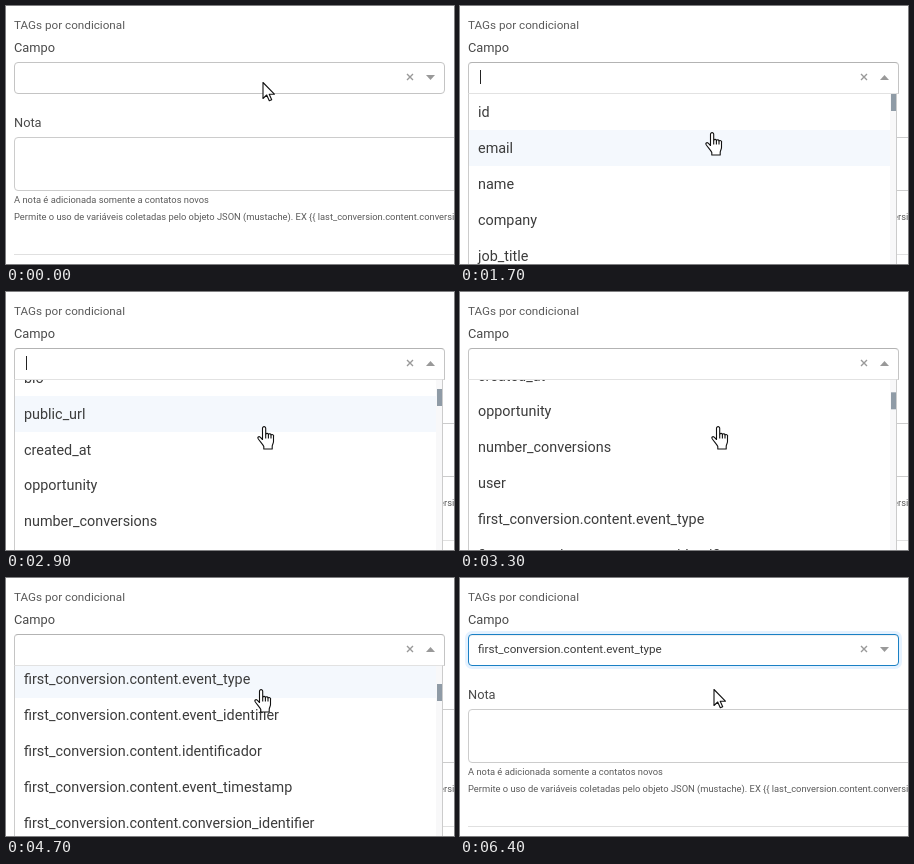
An HTML page for the animation above (7000 ms loop, 448 by 258 pixels).

```html
<!DOCTYPE html>
<html lang="pt-BR">
<head>
<meta charset="utf-8">
<title>TAGs por condicional</title>
<style>
  @property --scroll { syntax: "<number>"; inherits: true; initial-value: 0; }

  html, body { margin: 0; width: 100%; height: 100%; overflow: hidden; background: #fff; }
  #stage {
    position: relative; width: 448px; height: 258px; overflow: hidden;
    font-family: Roboto, sans-serif; color: #4a4a4a; white-space: nowrap;
  }
  #stage * { box-sizing: border-box; }
  #stage > *, .menu > *, .select > * { position: absolute; }

  /* one shared clock; every track holds its value unless a keyframe says otherwise */
  .anim { animation: 7s step-end infinite; }

  .text { left: 8px; height: 20px; line-height: 20px; }
  .title { top: 9px; font-size: 11.7px; color: #5a5a5a; }
  .label { font-size: 12.8px; }
  .hint { font-size: 9.35px; color: #5a5a5a; }
  .note { left: 8px; top: 131px; width: 460px; height: 54px; border: 1px solid #ccc; border-radius: 4px; }
  .rule { left: 8px; top: 248px; width: 440px; height: 1px; background: #e0e0e0; }

  .select {
    left: 8px; top: 56px; width: 431px; height: 32px;
    border: 1px solid #c4c4c4; border-radius: 4px; background: #fff;
    animation-name: frame;
  }
  .value { left: 9px; top: 4px; line-height: 20px; font-size: 11.7px; color: #3c3c3c; animation-name: chosen; }
  .caret { left: 11px; top: 7px; width: 1.3px; height: 14px; background: #222; animation-name: blink; }
  .clear { left: 391px; top: 10px; stroke: #999; stroke-width: 1.4; }
  .arrow {
    left: 411px; top: 12px; width: 9px; height: 5px; background: #999;
    clip-path: polygon(0 0, 100% 0, 50% 100%); animation-name: flip;
  }

  .menu {
    left: 8px; top: 87px; width: 429px; height: 180px; overflow: hidden;
    border: 1px solid #ccc; border-top-color: #e2e2e2; background: #fff;
    animation-name: open, scroll;
  }
  .list { left: 0; top: 0; width: 100%; padding-top: .95px; transform: translateY(calc(var(--scroll) * -1px)); }
  .mark { position: absolute; width: 100%; height: 36px; background: #f4f8fd; animation-name: mark; }
  .item { position: relative; height: 35.95px; padding-left: 9px; line-height: 36px; font-size: 14.4px; color: #3c3c3c; }
  .bar { right: 0; top: 0; width: 6px; height: 100%; background: #f8f8f9; }
  .thumb {
    right: 0; top: 0; width: 5px; height: 17px; background: #8f9ba6;
    transform: translateY(calc(var(--scroll) * .045px));
  }

  .cursor {
    left: 0; top: 0; overflow: visible; fill: #fff; stroke: #111; stroke-width: 1.1;
    stroke-linejoin: round; animation-name: move;
  }
  .pointer { animation-name: pointer; }
  .hand { animation-name: hand; }

  @keyframes open { 0% { opacity: 0 } 8.571% { opacity: 1 } 81.429%, 100% { opacity: 0 } }
  @keyframes chosen { 0% { opacity: 0 } 81.429%, 100% { opacity: 1 } }
  @keyframes flip { 0% { transform: none } 8.571% { transform: scaleY(-1) } 81.429%, 100% { transform: none } }
  @keyframes frame {
    0% { border-color: #c4c4c4; border-radius: 4px; box-shadow: none }
    8.571% { border-color: #b3b3b3 #c4c4c4 #d9d9d9; border-radius: 4px 4px 0 0; box-shadow: none }
    81.429%, 100% { border-color: #1a80c4; border-radius: 4px; box-shadow: inset 0 1px 1px #0001, 0 0 0 3px #007eff1a }
  }
  @keyframes blink {
    0%, 15.714%, 30%, 45.714%, 61.429%, 77.143%, 91.429%, 100% { opacity: 0 }
    8.571%, 22.857%, 37.143%, 54.286%, 68.571%, 84.286% { opacity: 1 }
  }
  @keyframes scroll {
    0%, 30% { --scroll: 0; animation-timing-function: steps(4, jump-start) }
    35.714%, 37.143% { --scroll: 100; animation-timing-function: steps(4, jump-start) }
    42.857%, 44.286% { --scroll: 200; animation-timing-function: steps(7, jump-start) }
    54.285% { --scroll: 372 }
    54.286%, 100% { --scroll: 400 }
  }
  @keyframes mark {
    0% { top: 0 }
    24.286% { top: 36px }
    34.286% { top: 144px }
    41.429% { top: 216px }
    55.714% { top: 432px }
    60%, 100% { top: 396px }
  }
  @keyframes move {
    0%, 15.714% { transform: translate(257px, 76px); animation-timing-function: steps(7, jump-start) }
    25.714%, 27.143% { transform: translate(252px, 126px); animation-timing-function: steps(2, jump-start) }
    30% { transform: translate(257px, 134px) }
    37.143%, 58.571% { transform: translate(258px, 134px); animation-timing-function: steps(3, jump-start) }
    62.857% { transform: translate(256px, 113px) }
    64.286% { transform: translate(255px, 111px) }
    82.857%, 100% { transform: translate(254px, 111px) }
  }
  @keyframes pointer { 0% { opacity: 1 } 17.143% { opacity: 0 } 82.857%, 100% { opacity: 1 } }
  @keyframes hand { 0% { opacity: 0 } 17.143% { opacity: 1 } 82.857%, 100% { opacity: 0 } }
</style>
</head>
<body>
<div id="stage">
  <div class="text title">TAGs por condicional</div>
  <div class="text label" style="top:32px">Campo</div>
  <div class="text label" style="top:107px">Nota</div>
  <div class="note"></div>
  <div class="text hint" style="top:184px">A nota é adicionada somente a contatos novos</div>
  <div class="text hint" style="top:201px">Permite o uso de variáveis coletadas pelo objeto JSON (mustache). EX {{ last_conversion.content.conversion_identifier }}</div>
  <div class="rule"></div>

  <div class="select anim">
    <div class="value anim">first_conversion.content.event_type</div>
    <div class="caret anim"></div>
    <svg class="clear" width="8" height="8"><path d="M1 1l6 6M7 1l-6 6"/></svg>
    <div class="arrow anim"></div>
  </div>

  <div class="menu anim">
    <div class="list">
      <div class="mark anim"></div>
      <div class="item">id</div>
      <div class="item">email</div>
      <div class="item">name</div>
      <div class="item">company</div>
      <div class="item">job_title</div>
      <div class="item">bio</div>
      <div class="item">public_url</div>
      <div class="item">created_at</div>
      <div class="item">opportunity</div>
      <div class="item">number_conversions</div>
      <div class="item">user</div>
      <div class="item">first_conversion.content.event_type</div>
      <div class="item">first_conversion.content.event_identifier</div>
      <div class="item">first_conversion.content.identificador</div>
      <div class="item">first_conversion.content.event_timestamp</div>
      <div class="item">first_conversion.content.conversion_identifier</div>
    </div>
    <div class="bar"></div>
    <div class="thumb"></div>
  </div>

  <svg class="cursor anim" width="20" height="24">
    <path class="pointer anim" d="M0 .5v16l3.7-3.5 2.6 5.8 2.4-1-2.5-5.6h5.2z"/>
    <g class="hand anim">
      <path d="M-1.5 13.5V2.2a1.6 1.6 0 0 1 3.2 0V8.6a1.3 1.3 0 0 1 2.7.3a1.3 1.3 0 0 1 2.6.5a1.3 1.3 0 0 1 2.5 1V15.5c0 2-1.3 3-1.3 5v2.5H-.2V20.5C-1 18.5-3.5 16-5.8 12.8C-6.8 11.2-5.2 10-3.8 11.2z"/>
      <path fill="none" d="M1.7 8.6v4M4.4 9v3.6M7 9.6v3"/>
    </g>
  </svg>
</div>
</body>
</html>
```
